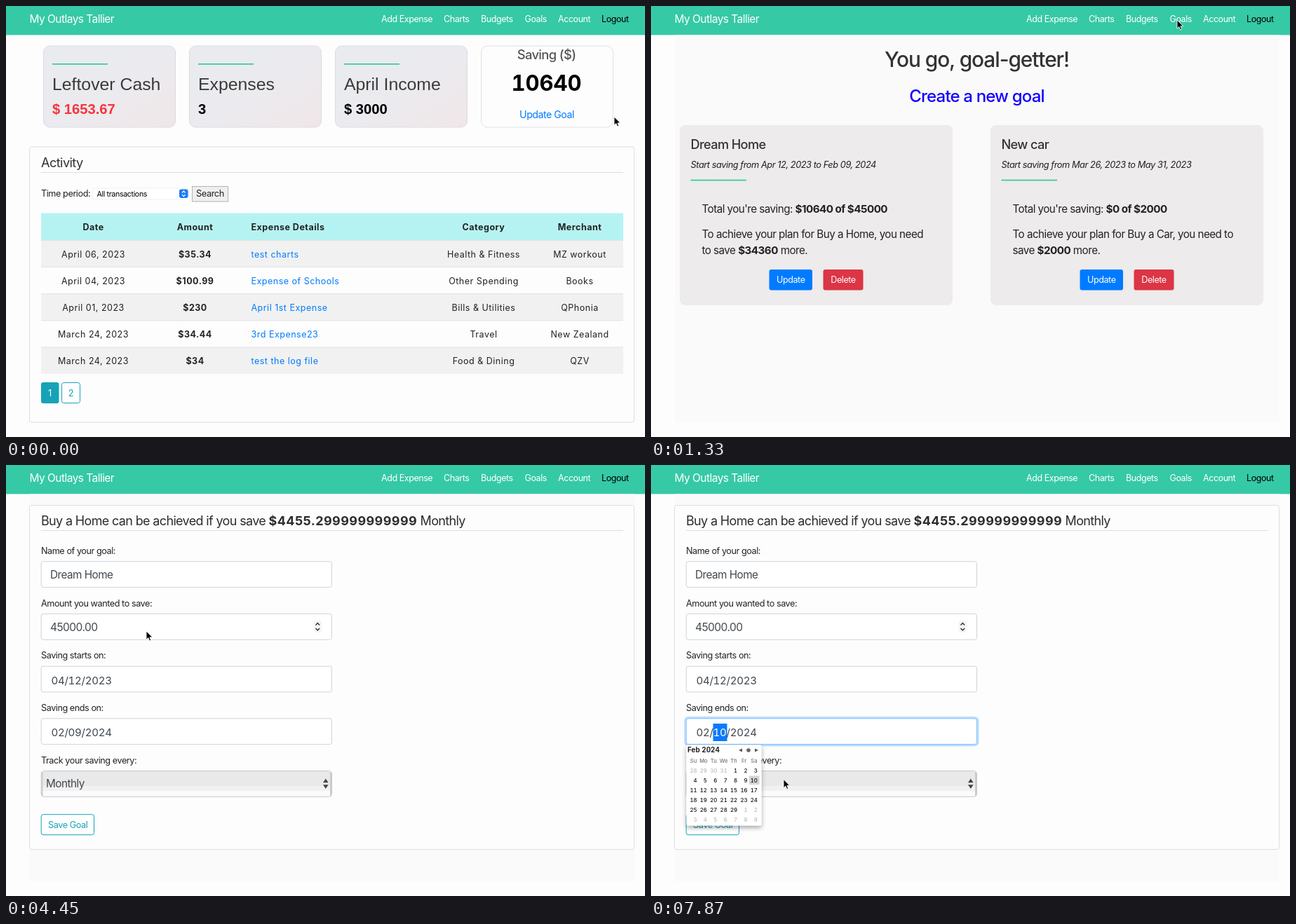
Write an HTML page that moves like this. It is 911 by 615 pixels and loops after 8000 ms.

```html
<!DOCTYPE html>
<html lang="en">
<head>
<meta charset="utf-8">
<title>Expense dashboard</title>
<style>
html, body { margin: 0; width: 100%; height: 100%; overflow: hidden; background: #fdfdfd; }
svg { display: block; width: 100%; height: 100%; fill: #222; }
text { font-family: Inter, sans-serif; letter-spacing: -.035em; white-space: pre; }
.medium { font-weight: 500; }
.bold { font-weight: 700; }
.plain { font-family: "Liberation Sans", Arial, sans-serif; letter-spacing: 0; }
.table { letter-spacing: .5px; }
.digits { letter-spacing: 0; font-variant-numeric: tabular-nums; }
.date { letter-spacing: -.02em; font-variant-numeric: tabular-nums; }
.wide { letter-spacing: .025em; }
.italic { font-style: italic; }
</style>
</head>
<body>
<svg id="stage" viewBox="0 0 911 615"></svg>
<script>
const GREEN = '#36c9a5', TEAL = '#17a2b8', BLUE = '#007bff', LINE = '#dcdedf';
const STEP = 148.2, LOOP = 8000;

const text = (x, y, size, str, cls = '', attrs = '') =>
  `<text x="${x}" y="${y}" font-size="${size}" class="${cls}" ${attrs}>${str}</text>`;
const centered = (x, y, size, str, cls = '', attrs = '') =>
  text(x, y, size, str, cls, 'text-anchor="middle" ' + attrs);
const rect = (x, y, w, h, fill, attrs = '') =>
  `<rect x="${x}" y="${y}" width="${w}" height="${h}" fill="${fill}" ${attrs}/>`;
const group = (id, body, attrs = '') => `<g id="${id}" ${attrs}>${body}</g>`;
const fill = color => `fill="${color}"`;
const frame = (color, rx = 3) => `stroke="${color}" rx="${rx}"`;
const bold = str => `<tspan class="bold">${str}</tspan>`;

// Shared header
const nav = [[535, 'Add Expense'], [624, 'Charts'], [677, 'Budgets'], [739.5, 'Goals'], [787, 'Account'], [849, 'Logout']];
const header = rect(0, 0, 911, 41.4, GREEN) +
  text(33.5, 23.5, 15.5, 'My Outlays Tallier', '', fill('#fff')) +
  rect(732, 1, 47, 35, '#d9718c', 'id="goalsHover" rx="17.5"') +
  nav.map(([x, label]) => text(x, 22.7, 12.5, label, '',
    `id="nav${label.split(' ')[0]}" ` + fill(label === 'Logout' ? '#000' : '#fff'))).join('');

// Dashboard
const statCard = (x, title, value, color = '#000') =>
  rect(x + .5, 57, 188, 116, 'url(#cardTint)', frame('#d9dce0', 9)) +
  rect(x + 13, 82, 79, 1.7, GREEN) +
  text(x + 13, 120, 24.8, title, 'plain', fill('#3a3a3a')) +
  text(x + 13, 154, 20.2, value, 'plain bold', fill(color));

const columns = [124.5, 269.5, 349.5, 681, 818];
const tableRow = (cells, y, head) => cells.map((str, i) =>
  (i === 2 ? text : centered)(columns[i], y, 12.5, str, 'table' + (head || i === 1 ? ' bold' : ''),
    i === 2 && !head ? fill(BLUE) : '')).join('');
const expenses = [
  ['April 06, 2023', '$35.34', 'test charts', 'Health &amp; Fitness', 'MZ workout'],
  ['April 04, 2023', '$100.99', 'Expense of Schools', 'Other Spending', 'Books'],
  ['April 01, 2023', '$230', 'April 1st Expense', 'Bills &amp; Utilities', 'QPhonia'],
  ['March 24, 2023', '$34.44', '3rd Expense23', 'Travel', 'New Zealand'],
  ['March 24, 2023', '$34', 'test the log file', 'Food &amp; Dining', 'QZV']];

const dashboard =
  statCard(53, 'Leftover Cash', '$ 1653.67', '#f5363c') +
  statCard(261, 'Expenses', '3') +
  statCard(469, 'April Income', '$ 3000') +
  group('flip',
    group('front', statCard(677, 'Goal', 'Buy a Home')) +
    group('back', rect(677.5, 57, 188, 116, '#fdfdfd', frame('#dfe1e3', 9)) +
      centered(770.5, 75.5, 18.4, 'Saving ($)', 'medium', fill('#555')) +
      centered(770.5, 120.5, 31, '10640', 'bold digits', fill('#000')) +
      centered(771, 160, 14.2, 'Update Goal', '', fill(BLUE)))) +
  rect(33.5, 201, 862, 393, '#fdfdfd', frame(LINE)) +
  text(50, 230, 18.3, 'Activity', '', fill('#333')) + rect(50, 237, 830, 1, LINE) +
  text(50, 272, 12.7, 'Time period:') +
  rect(123.5, 260, 137, 16, '#fff', frame('#efefef', 4)) +
  text(129.5, 272, 10.7, 'All transactions', '', fill('#000')) +
  rect(247, 261.5, 12.5, 12.5, '#1a7cf5', 'rx="3"') +
  '<path d="M251 266.5l2.3-2.5 2.3 2.5M251 269.2l2.3 2.5 2.3-2.5" fill="none" stroke="#fff" stroke-width="1.2"/>' +
  rect(265.5, 257.5, 51, 21.5, '#efefef', 'stroke="#b4b4b4"') + text(271, 272, 12.8, 'Search') +
  rect(50, 295.5, 830, 39, '#b5f3f2') +
  tableRow(['Date', 'Amount', 'Expense Details', 'Category', 'Merchant'], 319.5, true) +
  expenses.map((cells, i) => rect(50, 334.5 + 38.1 * i, 830, 38.1, i % 2 ? '#fdfdfd' : '#f1f1f1') +
    rect(50, 334 + 38.1 * i, 830, 1, '#dee2e6') + tableRow(cells, 358.5 + 38 * i)).join('') +
  rect(50, 537, 25.5, 30, TEAL, 'rx="3"') + centered(62.5, 557, 12.8, '1', '', fill('#fff')) +
  rect(79.5, 537.5, 26, 29, '#fff', frame(TEAL)) + centered(92.5, 557, 12.8, '2', '', fill(TEAL));

// Goal list
const button = (x, w, label, color, id = '') => rect(x, 376, w, 29.5, color, `rx="3" ${id}`) +
  centered(x + w / 2, 395.3, 12.6, label, '', fill('#fff'));
const goalCard = (x, name, dates, total, plan, rest, id) => group(id,
  rect(0, 170, 389, 257, '#edebeb', 'rx="8"') +
  text(15.5, 204, 18.2, name, 'medium', fill('#333')) +
  text(15.5, 231, 12.8, 'Start saving from ' + dates, 'italic') +
  rect(15.5, 247.7, 79.5, 1.7, GREEN) +
  text(31.5, 294.5, 15.2, `Total you're saving: ${bold(total)}`) +
  text(31.5, 330.5, 15.2, plan) + text(31.5, 353.5, 15.2, rest) +
  button(127.5, 61.5, 'Update', BLUE, 'class="update"') + button(204.5, 57, 'Delete', '#dc3545'),
  `transform="translate(${x} 0)"`);
const goals = rect(34, 41.4, 862, 552.6, '#fafafa') +
  centered(464.5, 87, 29.8, 'You go, goal-getter!', 'medium', fill('#333')) +
  centered(464.5, 137, 24, 'Create a new goal', 'medium', fill('#1200ff')) +
  goalCard(41, 'Dream Home', 'Apr 12, 2023 to Feb 09, 2024', '$10640 of $45000',
    'To achieve your plan for Buy a Home, you need', `to save ${bold('$34360')} more.`, 'home') +
  goalCard(484, 'New car', 'Mar 26, 2023 to May 31, 2023', '$0 of $2000',
    'To achieve your plan for Buy a Car, you need to', `save ${bold('$2000')} more.`, 'car');

// Goal form
const labels = ['Name of your goal:', 'Amount you wanted to save:', 'Saving starts on:', 'Saving ends on:', 'Track your saving every:'];
const GRAY = '#41484f', INPUT = '#ced4da';
const fieldY = i => 137.7 + 74.7 * i;
const calendarX = i => 60.5 + 14.4 * i;
const days = Array.from({ length: 42 }, (_, i) => {
  const day = i - 3, inMonth = day > 0 && day < 30;
  return text(calendarX(i % 7) + 5, 438.6 + 14 * Math.floor(i / 7), 7.8,
    inMonth ? day : day < 1 ? day + 31 : day - 29, 'digits medium',
    'text-anchor="end" ' + fill(inMonth ? '#111' : '#bbb'));
}).join('');
const calendar = rect(50.5, 399.5, 107, 115, '#fff', 'rx="2" filter="url(#shadow)"') +
  text(52, 410.4, 9.9, 'Feb 2024', 'bold digits') +
  '<path d="M130 404.5v5l-5-2.5zM148 404.5v5l5-2.5z" fill="#555"/><circle cx="139" cy="407" r="2.8" fill="#666"/>' +
  ['Su', 'Mo', 'Tu', 'We', 'Th', 'Fr', 'Sa'].map((d, i) =>
    centered(calendarX(i), 424.8, 7.6, d, 'digits medium', fill('#777'))).join('') +
  rect(140, 443.5, 14.5, 12.5, '#d4d4d4', 'id="picked"') + days;
const form = rect(34, 41.4, 862, 552.6, '#fafafa') +
  rect(33.5, 57.5, 862, 491, '#fdfdfd', frame(LINE)) +
  text(50, 86, 17.97, `Buy a Home can be achieved if you save <tspan class="bold wide">$4455.299999999999</tspan> Monthly`, '', fill('#2c2c2c')) +
  rect(50, 93, 830, 1, LINE) +
  rect(47.2, fieldY(3) - 3, 420.3, 42.8, '#bfdeff', 'id="focusRing" rx="6"') +
  labels.map((label, i) => text(50, 127 + 74.7 * i, 12.65, label) +
    (i < 4 ? rect(50.2, fieldY(i), 414.3, 36.8, '#fff', frame(INPUT) + (i === 3 ? ' id="endField"' : '')) : '')).join('') +
  text(63, 162, 15.3, 'Dream Home', '', fill(GRAY)) +
  text(63, 236.5, 15.5, '45000.00', '', fill(GRAY)) +
  rect(438.5, 222, 11.5, 17, '#f4f4f4', 'rx="4"') +
  '<path d="M441.5 228.5l2.8-3 2.8 3M441.5 233l2.8 3 2.8-3" fill="none" stroke="#333" stroke-width="1.4"/>' +
  text(64.5, 312.5, 15.1, '04/12/2023', 'date', fill(GRAY)) +
  rect(88.5, 369, 20, 25, '#0a7aff', 'id="selection"') +
  text(64.5, 387.2, 15.1, '02/<tspan id="day">09</tspan>/2024', 'date', fill(GRAY)) +
  rect(50.2, 436.5, 414.3, 36.8, '#fbfbfb', frame('#c6c9cd', 4)) +
  rect(51, 437, 413, 21, '#e9e9e9') + rect(51, 458, 413, 7, '#f1f1f1') +
  rect(50.5, 438, 2, 34, '#c9cbce') + rect(462, 438, 2, 34, '#c9cbce') +
  text(57, 460, 15.3, 'Monthly', '', fill(GRAY)) +
  '<path d="M452 453.3l3.8-5.8 3.8 5.8zM452 456.2l3.8 5.8 3.8-5.8z" fill="#444"/>' +
  rect(50.2, 498.7, 75.3, 29, '#fff', frame(TEAL)) + text(60, 518, 12.7, 'Save Goal', '', fill(TEAL)) +
  group('calendar', calendar);

const cursors =
  '<path id="arrow" d="M0 0V12.2L2.8 9.6 4.7 14 6.7 13.1 4.9 8.9H8.8z" fill="#000" stroke="#fff" stroke-width=".9"/>' +
  '<path id="hand" d="M-1 1Q0-.5 1 1V4.6Q4.5 4.3 6.7 6V9Q6.3 11 5.4 13H.2Q-1.5 10-3.6 7.7-3 6.2-1 7.6zM2.5 5v2.5M4.6 5.3v2.4" fill="#fff" stroke="#000" stroke-width=".9" stroke-linejoin="round"/>';

document.getElementById('stage').innerHTML = `<defs>
  <linearGradient id="cardTint" x2="1" y2="1"><stop stop-color="#e9ebee"/><stop offset=".5" stop-color="#ebebef"/><stop offset="1" stop-color="#f0e6e8"/></linearGradient>
  <filter id="shadow" x="-20%" y="-20%" width="140%" height="150%"><feDropShadow dx="0" dy="3" stdDeviation="3" flood-opacity=".35"/></filter>
  </defs>` + rect(0, 0, 911, 615, '#fdfdfd') + header +
  group('dashboard', dashboard) + group('goals', goals) + group('form', form) + group('cursor', cursors);

const el = id => document.getElementById(id);
const show = (id, on) => el(id).setAttribute('display', on ? 'inline' : 'none');
const clamp = v => Math.min(1, Math.max(0, v));
const ease = v => v * v * (3 - 2 * v);

// Pointer stops: step, x, y
const stops = [[0, 867, 158], [7, 752, 22], [8, 752, 22], [9, 750, 20], [10, 750, 20], [18, 195, 397],
  [20, 196, 398], [21, 196, 398], [22, 194.5, 397], [25, 194.5, 397], [28, 224, 310], [30, 200, 237], [33, 101, 350],
  [36, 98, 384], [37, 98, 384], [38, 102, 380], [40, 102, 380], [45, 138, 465], [46, 138, 465],
  [49, 145, 449], [51, 145, 447], [52, 145, 447], [53, 189, 448.5], [54, 189, 448.5]];
function pointerAt(step) {
  const i = Math.max(1, stops.findIndex(s => s[0] >= step));
  const [a, ax, ay] = stops[i - 1], [b, bx, by] = stops[i];
  const k = ease((step - a) / (b - a));
  return [ax + (bx - ax) * k, ay + (by - ay) * k];
}

function draw(time) {
  // The picture advances in even steps, like a screen recording.
  const step = Math.floor((time % LOOP + 8) / STEP);
  const [x, y] = pointerAt(step);
  const page = step < 9 ? 'dashboard' : step < 22 ? 'goals' : 'form';
  for (const id of ['dashboard', 'goals', 'form']) show(id, id === page);

  const overGoals = page === 'dashboard' && y < 36 && x < 779;
  const overUpdate = page === 'goals' && x > 169 && x < 230 && y > 376;
  show('goalsHover', overGoals);
  el('navGoals').setAttribute('fill', overGoals ? '#000' : '#fff');
  document.querySelector('#home .update').setAttribute('fill', overUpdate ? '#0069d9' : BLUE);
  show('hand', overGoals || overUpdate);
  show('arrow', !overGoals && !overUpdate);
  el('cursor').setAttribute('transform', `translate(${x} ${y})`);

  const turn = Math.cos(Math.PI * ease(clamp((step - 2) / 4)));
  show('back', turn > 0);
  show('front', turn <= 0);
  el('flip').setAttribute('transform', `translate(771 0) scale(${Math.max(.01, Math.abs(turn))} 1) translate(-771 0)`);

  const focused = step >= 37, open = step >= 38, chosen = step >= 49;
  el('endField').setAttribute('stroke', open ? '#80bdff' : focused ? '#a9cdf3' : INPUT);
  show('focusRing', open);
  show('selection', focused);
  show('calendar', open);
  el('day').textContent = chosen ? '10' : '09';
  el('day').setAttribute('fill', focused ? '#fff' : GRAY);
  el('picked').setAttribute('x', chosen ? 140 : 125.6);
}

const start = performance.now();
function tick() {
  draw(performance.now() - start);
  requestAnimationFrame(tick);
}
tick();
</script>
</body>
</html>
```
